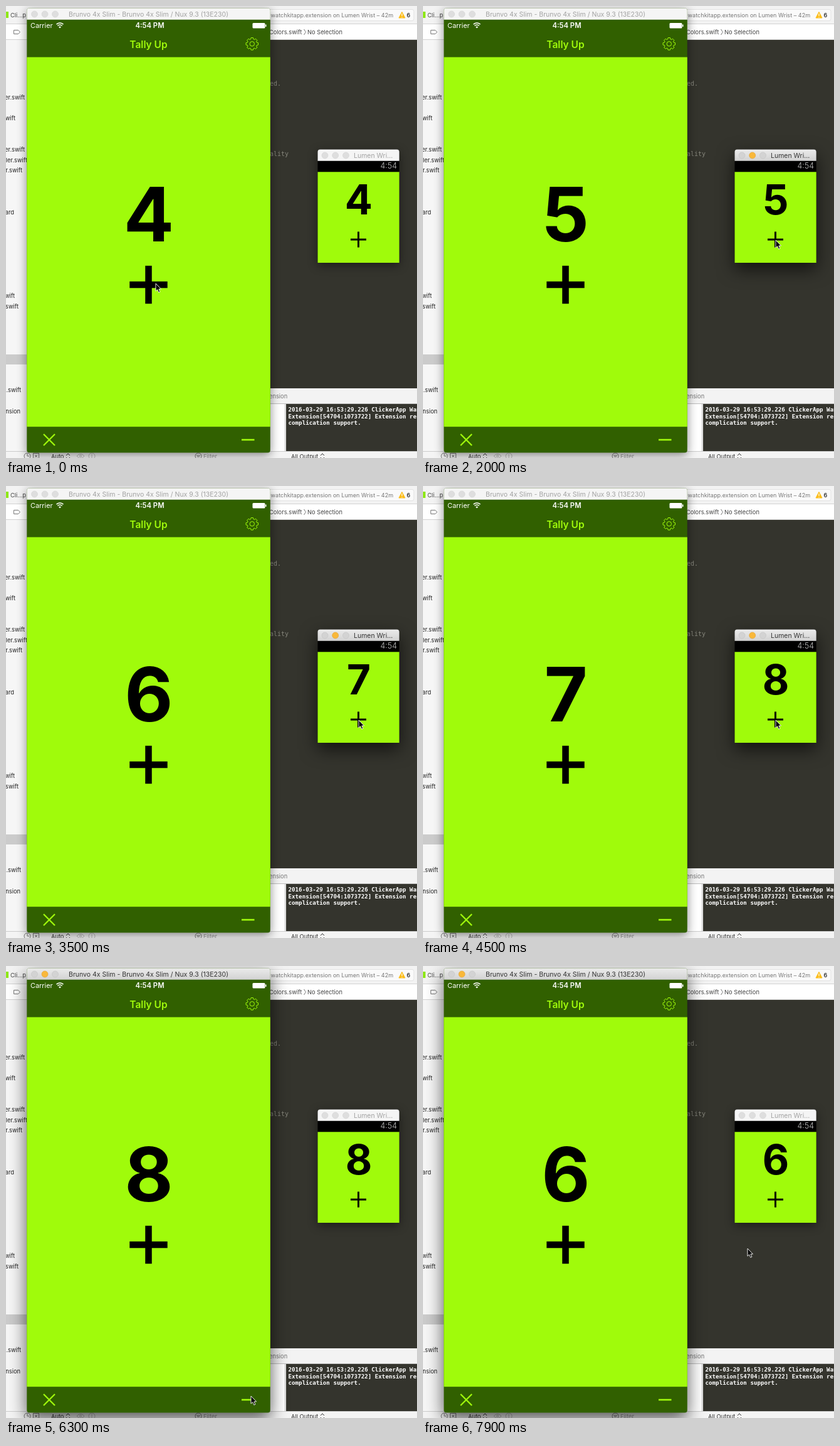
Write an HTML page that moves like this. It is 656 by 720 pixels and loops after 8 s.

```html
<!DOCTYPE html>
<html lang="en">
<head>
<meta charset="utf-8">
<title>Counter sync</title>
<style>
  html, body { margin: 0; width: 100%; height: 100%; overflow: hidden; }
  svg { display: block; width: 656px; height: 720px; font: 9.3px Inter, sans-serif; }
  text { white-space: pre; }
  .mono { font-family: "DejaVu Sans Mono", monospace; }
  .mid { text-anchor: middle; }
  .icon { fill: none; stroke: #777; }
  .lime { fill: none; stroke: #a0fb0b; }
  .digit { font-weight: 700; text-anchor: middle; }
  .bar { fill: #f5f5f5; }
  .title { fill: #a2a2a2; font-size: 10.5px; }
  .light { fill: #dedede; stroke: #d2d2d2; stroke-width: .6; }
  .frame { filter: drop-shadow(0 4px 8px #0007); }
  .active .frame { filter: drop-shadow(0 10px 14px #000a); }
  .active .bar { fill: url(#chrome); }
  .active .title { fill: #333; }
  .active .light { fill: #d3d3d3; stroke: #c3c3c3; }
  .active .main { fill: #f9b83a; stroke: #dfa033; }
</style>
</head>
<body>
<svg viewBox="0 0 656 720">
  <defs>
    <linearGradient id="chrome" x2="0" y2="1">
      <stop stop-color="#ebebeb"/><stop offset="1" stop-color="#d2d2d2"/>
    </linearGradient>
  </defs>

  <!-- editor behind both windows -->
  <rect width="656" height="720" fill="#fff"/>
  <rect y="54" width="40" height="655" fill="#f6f6f6"/>
  <rect width="656" height="28" fill="#f3f3f3"/>
  <path d="M0 28.5H656M0 53.5H656" stroke="#d2d2d2"/>
  <rect x="300" y="5.5" width="351" height="18" rx="3" fill="#fafafa" stroke="#e2e2e2"/>
  <rect y="9" width="4" height="10" fill="#8fe817"/>
  <text x="7" y="17.5" fill="#444">Cli...p</text>
  <text x="420" y="17.5" fill="#777" font-size="9.100">.watchkitapp.extension on Lumen Wrist – 42m</text>
  <path d="M632 9.500l5 9.500h-10z" fill="#fdbd18" stroke="#fdbd18" stroke-linejoin="round"/>
  <path d="M632 12v4M632 17.500v1" stroke="#fff" stroke-width="1.2"/>
  <text x="639.500" y="17.500" fill="#333" font-size="9" font-weight="600">6</text>
  <path class="icon" d="M12.500 38.500h7l3 3-3 3h-7z"/>
  <text x="420" y="45" fill="#444">Colors.swift</text>
  <path class="icon" d="M475.500 37l3 4.500-3 4.500"/>
  <text x="481" y="45" fill="#444">No Selection</text>
  <rect y="555" width="40" height="16" fill="#cbcbcb"/>
  <g id="files" fill="#222"></g>

  <rect x="400" y="54" width="256" height="555" fill="#34342d"/>
  <g class="mono" font-size="10" fill="#85857b">
    <text x="421" y="127">ed.</text>
    <text x="421" y="239">ality</text>
  </g>
  <rect x="400" y="609" width="256" height="24" fill="#f3f3f3"/>
  <path d="M400 633.500H656M445.500 633V720" stroke="#bcbcbc"/>
  <text x="420" y="625" fill="#777">ension</text>
  <rect x="447" y="634" width="209" height="75" fill="#34342d"/>
  <g class="mono" font-size="9.2" font-weight="700" fill="#fff">
    <text x="450.500" y="646">2016-03-29 16:53:29.226 ClickerApp Watch</text>
    <text x="450.500" y="656.500">Extension[54704:1073722] Extension received</text>
    <text x="450.500" y="667">complication support.</text>
  </g>
  <rect y="709" width="656" height="11" fill="#f4f4f4"/>
  <path d="M0 709.500H656" stroke="#ccc"/>
  <g fill="#333">
    <text x="72" y="720.500">Auto</text>
    <text x="455" y="720.500">All Output</text>
    <text x="315" y="720.500" fill="#999">Filter</text>
  </g>
  <g class="icon">
    <circle cx="34" cy="717" r="5"/><path d="M34 713v4h3M43.500 712.500h9v9h-9zM46 715l4 4m0-4l-4 4"/>
    <path d="M96 716l3-3 3 3m-6 3l3 3 3-3M502 716l3-3 3 3m-6 3l3 3 3-3" stroke="#333"/>
    <g stroke="#bbb"><path d="M113 717q6-7 12 0q-6 7-12 0"/><circle cx="119" cy="717" r="1.500"/><circle cx="137" cy="717" r="5"/><path d="M137 714v6"/></g>
    <circle cx="307" cy="717" r="5"/><path d="M304 716h6M305 718h4"/>
  </g>

  <!-- phone -->
  <g id="phone">
    <rect class="frame" x="33.300" y="3.500" width="388.500" height="708" rx="4" fill="#316000"/>
    <path class="bar" d="M33.300 21.700V7.500q0-4 4-4H417.800q4 0 4 4V21.700z"/>
    <g class="light"><circle cx="45.500" cy="13" r="5"/><circle class="main" cx="62" cy="13" r="5"/><circle cx="78.500" cy="13" r="5"/></g>
    <text class="title mid" x="227.500" y="16.800">Brunvo 4x Slim - Brunvo 4x Slim / Nux 9.3 (13E230)</text>
    <rect x="33.300" y="81.500" width="388.500" height="588.700" fill="#a0fb0b"/>
    <g fill="#fff">
      <text x="39" y="35.300" font-size="10.900">Carrier</text>
      <text class="mid" x="229.500" y="35.300" font-size="11.300" font-weight="600">4:54 PM</text>
      <rect x="393.500" y="27" width="20" height="8.500" rx="1.500"/>
      <rect x="414" y="29.500" width="1.500" height="3.500"/>
      <path d="M84 33.300q2-1.800 4 0l-2 2.200z"/>
      <path d="M82.300 31.500q3.700-3 7.400 0M80.500 29.200q5.500-4.200 11 0" fill="none" stroke="#fff" stroke-width="1.500"/>
    </g>
    <text class="mid" x="227.500" y="66.500" fill="#a0fb0b" font-size="15.500" font-weight="600">Tally Up</text>
    <path id="gear" class="lime" transform="translate(392.800 60.300)" stroke-linejoin="round"/>
    <circle class="lime" cx="392.800" cy="60.300" r="3.700"/>
    <text class="digit" id="phoneDigit" y="374.500" x="228" font-size="119"></text>
    <path d="M197.300 444H257.700M227.500 413.800V474.200" stroke="#000" stroke-width="10.500"/>
    <path class="lime" d="M60 682l18 18m0-18l-18 18" stroke-width="2.300"/>
    <path class="lime" d="M376 691h20.500" stroke-width="2.600"/>
  </g>

  <!-- watch -->
  <g id="watch">
    <path class="frame" d="M497.500 409V232.500q0-4 4-4H623.700q4 0 4 4V409z"/>
    <path class="bar" d="M497.500 246.700V232.500q0-4 4-4H623.700q4 0 4 4V246.700z"/>
    <g class="light"><circle cx="509" cy="238" r="5"/><circle class="main" cx="525.700" cy="238" r="5"/><circle cx="542.500" cy="238" r="5"/></g>
    <text class="title" x="555" y="241.500">Lumen Wri...</text>
    <text x="624" y="259" text-anchor="end" fill="#c4c4c4" font-size="12.500" font-weight="300">4:54</text>
    <rect x="497.500" y="264.300" width="130.200" height="144.700" fill="#a0fb0b"/>
    <text class="digit" id="watchDigit" x="563" y="332" font-size="65.500"></text>
    <path d="M550 372h25M562.500 359.500v25" stroke="#000" stroke-width="3"/>
  </g>

  <path id="cursor" d="M0 0V12.200L2.700 9.700 4.800 14.300 6.900 13.300 4.900 8.900H8.600Z" stroke="#fff" stroke-width=".9"/>
</svg>
<script>
const $ = id => document.getElementById(id);
const LOOP = 8000;

$('files').innerHTML = [
  [146, 30, 'er.swift'], [179, 15, 'wift'], [229, 30, 'er.swift'], [246, 34, 'ller.swift'],
  [262, 26, 'r.swift'], [329, 13, 'ard'], [462, 14, 'wift'], [479, 20, 'swift'],
  [612, 24, '.swift'], [646, 23, 'nsion']
].map(([y, x, name]) => `<text x="${x}" y="${y + 3.4}" text-anchor="end">${name}</text>`).join('');

const polar = (r, a) => `${(r * Math.cos(a)).toFixed(2)} ${(r * Math.sin(a)).toFixed(2)}`;
let gear = '';
for (let i = 0; i < 8; i++)
  for (const [r, a] of [[7.7, -.3], [9.9, -.17], [9.9, .17], [7.7, .3]])
    gear += (gear ? 'L' : 'M') + polar(r, i * Math.PI / 4 + a);
$('gear').setAttribute('d', gear + 'Z');

// [start time, value]
const phoneCount = [[0, 4], [750, 5], [2900, 6], [3800, 7], [4700, 8], [6500, 7], [7300, 6]];
const watchCount = [[0, 4], [1150, 5], [2400, 6], [3300, 7], [4300, 8], [6900, 7], [7700, 6]];
const focus = [[0, ''], [300, 'phone'], [1900, 'watch'], [6050, 'phone']];
// [time, x, y]
const path = [
  [0, 239, 442], [1100, 239, 442], [1800, 563, 373], [4800, 563, 373], [5500, 371, 555],
  [5950, 391, 685], [7400, 391, 685], [7900, 518, 450], [LOOP, 518, 450]
];

const at = (steps, t) => steps.findLast(s => s[0] <= t)[1];
const clamp = v => Math.min(1, Math.max(0, v));
const ease = v => v * v * (3 - 2 * v);

function pointer(t) {
  const i = path.findIndex(p => p[0] > t);
  const [t0, x0, y0] = path[i - 1], [t1, x1, y1] = path[i];
  const k = ease((t - t0) / (t1 - t0));
  return [x0 + (x1 - x0) * k, y0 + (y1 - y0) * k];
}

function draw(t) {
  const active = at(focus, t);
  for (const id of ['phone', 'watch']) $(id).classList.toggle('active', id === active);
  $('phoneDigit').textContent = at(phoneCount, t);
  $('watchDigit').textContent = at(watchCount, t);
  // a tap on the phone makes its digit swell briefly
  const swell = 1 + .25 * clamp((t - 750) / 150) * clamp((1150 - t) / 150);
  $('phoneDigit').setAttribute('transform', `translate(228 332) scale(${swell}) translate(-228 -332)`);
  $('cursor').setAttribute('transform', `translate(${pointer(t)})`);
}

const start = performance.now();
function tick() {
  draw((performance.now() - start) % LOOP);
  requestAnimationFrame(tick);
}
tick();
</script>
</body>
</html>
```
